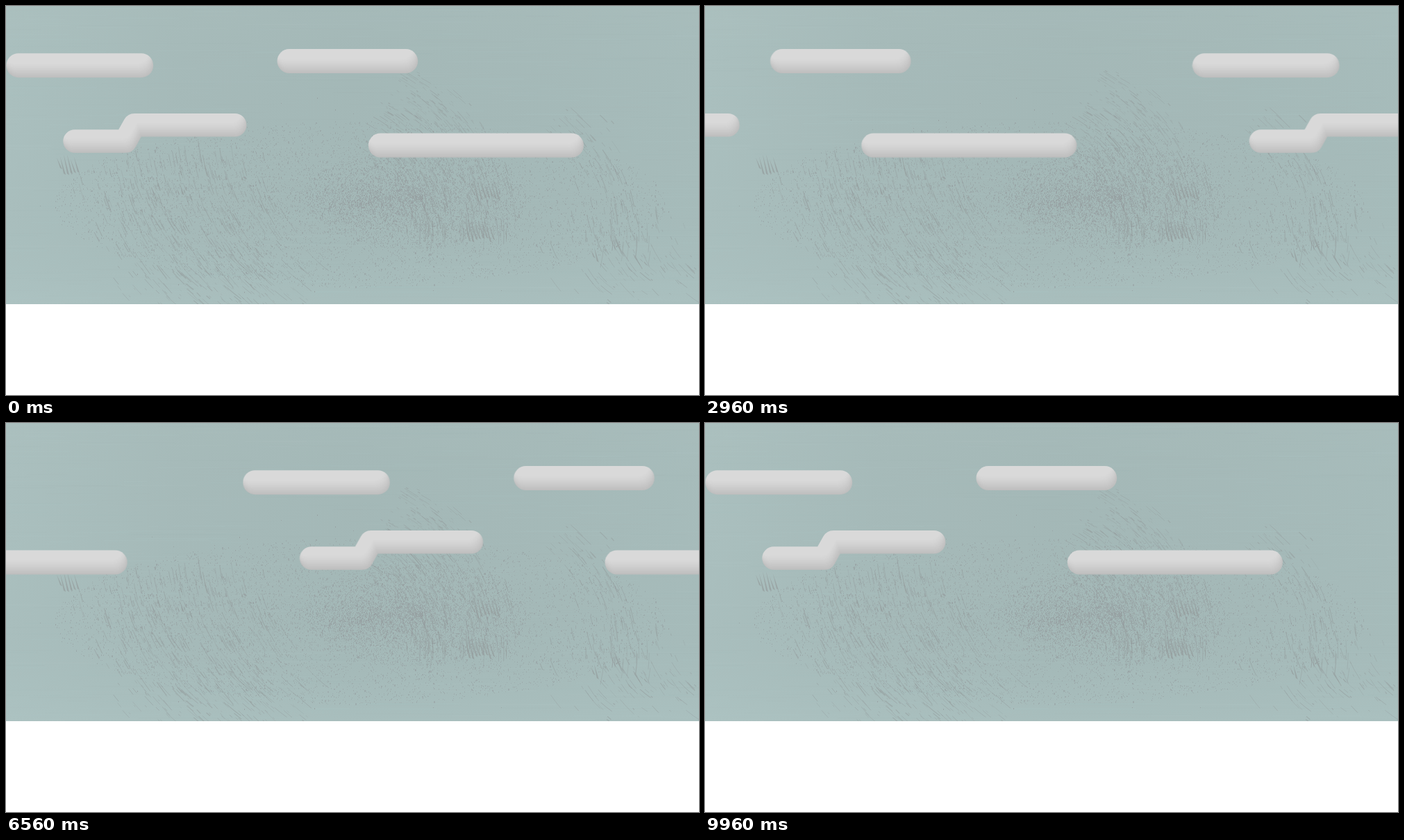
Recreate the animation shown at these times as an HTML page with a canvas. Size 998x561 px, loop 10000 ms.

```html
<!DOCTYPE html>
<html>
<head>
<meta charset="utf-8">
<style>
  html, body { margin: 0; width: 100%; height: 100%; overflow: hidden; background: #fff; }
  canvas { display: block; }
</style>
</head>
<body>
<canvas id="stage" width="998" height="561"></canvas>
<script>
const W = 998, H = 561, WALL = 430, LOOP = 10000, STEP = 40;
const stage = document.getElementById('stage').getContext('2d');

function layer() {
  const canvas = document.createElement('canvas');
  canvas.width = W;
  canvas.height = WALL;
  return canvas.getContext('2d');
}

let seed = 7;
function rnd(a = 0, b = 1) {
  seed = (seed * 16807) % 2147483647;
  return a + (b - a) * seed / 2147483647;
}

function gradient(g, fill, colors) {
  colors.forEach((c, i) => fill.addColorStop(i / (colors.length - 1), c));
  g.fillStyle = fill;
  g.fillRect(0, 0, W, WALL);
}

// Fine grains in an ellipse, thinning out towards its rim
function grains(g, x, y, rx, ry, count) {
  for (let i = 0; i < count; i++) {
    const angle = rnd(0, 2 * Math.PI), r = rnd() ** .7;
    const size = rnd() < .04 ? 2 : 1;
    g.fillRect(Math.round(x + Math.cos(angle) * r * rx), Math.round(y + Math.sin(angle) * r * ry),
      size, size + (rnd() < .4));
  }
}

// Short scratches along arcs whose centre drifts to the right by `drift`
function sweep(g, x, y, drift, rMin, rMax, from, to, count) {
  for (let i = 0; i < count; i++) {
    const r = rnd(rMin, rMax), angle = rnd(from, to), length = 3 + 28 * rnd() ** 3;
    g.lineWidth = rnd(.4, 1.1);
    g.beginPath();
    g.arc(x + drift * rnd(), y, r, angle, angle + length / r);
    g.stroke();
  }
}

// A cluster of tapered brush marks
function marks(g, x, y, w, h) {
  for (let px = x; px < x + w; px += 5) {
    const end = y + h * rnd(.7, 1);
    g.beginPath();
    g.moveTo(px, y + h * rnd(0, .3));
    g.lineTo(px + h / 4, end);
    g.lineTo(px + h / 4 - 3, end - 2);
    g.fill();
  }
}

function drawWall() {
  const g = layer();
  gradient(g, g.createLinearGradient(0, 0, W, 0), ['#abc0bf', '#a6bab9', '#a4b8b7', '#a5b9b8', '#a7bcbb']);
  gradient(g, g.createLinearGradient(0, 0, 0, WALL),
    ['rgba(170,190,188,.25)', 'rgba(160,182,181,.1)', 'rgba(160,182,181,.2)', 'rgba(173,196,195,.5)']);

  for (let i = 0; i < 500; i++) {
    g.fillStyle = rnd() < .5 ? 'rgba(185,205,204,.07)' : 'rgba(145,168,168,.06)';
    g.fillRect(rnd(-80, W), rnd(0, WALL), rnd(30, 180), 1);
  }

  g.fillStyle = 'rgba(150,158,159,.5)';
  grains(g, 510, 285, 440, 120, 8500);
  grains(g, 590, 275, 160, 75, 4500);
  grains(g, 530, 275, 75, 45, 1200);

  g.strokeStyle = 'rgba(148,156,157,.6)';
  sweep(g, 450, 165, 200, 260, 380, 2.2, 2.95, 900);
  sweep(g, 430, 330, 50, 140, 270, -1.1, 0, 700);
  sweep(g, 640, 330, 60, 190, 240, -.9, .1, 160);
  sweep(g, 960, 270, 160, 140, 220, 2.1, 2.9, 160);

  g.fillStyle = 'rgba(150,157,158,.75)';
  marks(g, 660, 304, 38, 38);
  marks(g, 668, 248, 36, 36);
  marks(g, 73, 212, 28, 32);
  marks(g, 250, 248, 10, 27);
  marks(g, 842, 344, 10, 27);
  grains(g, 500, 280, 470, 150, 120);
  return g.canvas;
}

function drawPills() {
  const g = layer(), depth = 20;
  const pills = [
    [35, 18, 85.7, 194.7, 85.7],
    [35, 408, 79.5, 575.7, 79.5],
    [33.5, 99, 195, 172, 195, 185, 171.7, 329.7, 171.7],
    [35, 539.3, 201, 814.5, 201]
  ];
  g.lineCap = g.lineJoin = 'round';
  // Lighter copies move up and left, leaving a soft shade along the lower edge
  for (let lift = 0; lift <= depth; lift++) {
    const tone = 217 - 27 * (1 - lift / depth) ** 1.2;
    g.strokeStyle = `rgb(${tone},${tone},${tone})`;
    for (const [width, ...p] of pills) {
      g.lineWidth = width;
      g.beginPath();
      for (let i = 0; i < p.length; i += 2) g.lineTo(p[i] - lift * .3, p[i + 1] - lift);
      g.stroke();
    }
    g.globalCompositeOperation = 'source-atop';
  }
  return g.canvas;
}

const wall = drawWall(), pills = drawPills();
const start = performance.now();

function frame() {
  const time = (performance.now() - start) % LOOP;
  const shift = Math.floor(time / STEP) / (LOOP / STEP - 1) * W;
  stage.fillStyle = '#fff';
  stage.fillRect(0, 0, W, H);
  stage.drawImage(wall, 0, 0);
  stage.drawImage(pills, -shift, 0);
  stage.drawImage(pills, W - shift, 0);
  requestAnimationFrame(frame);
}
frame();
</script>
</body>
</html>
```
